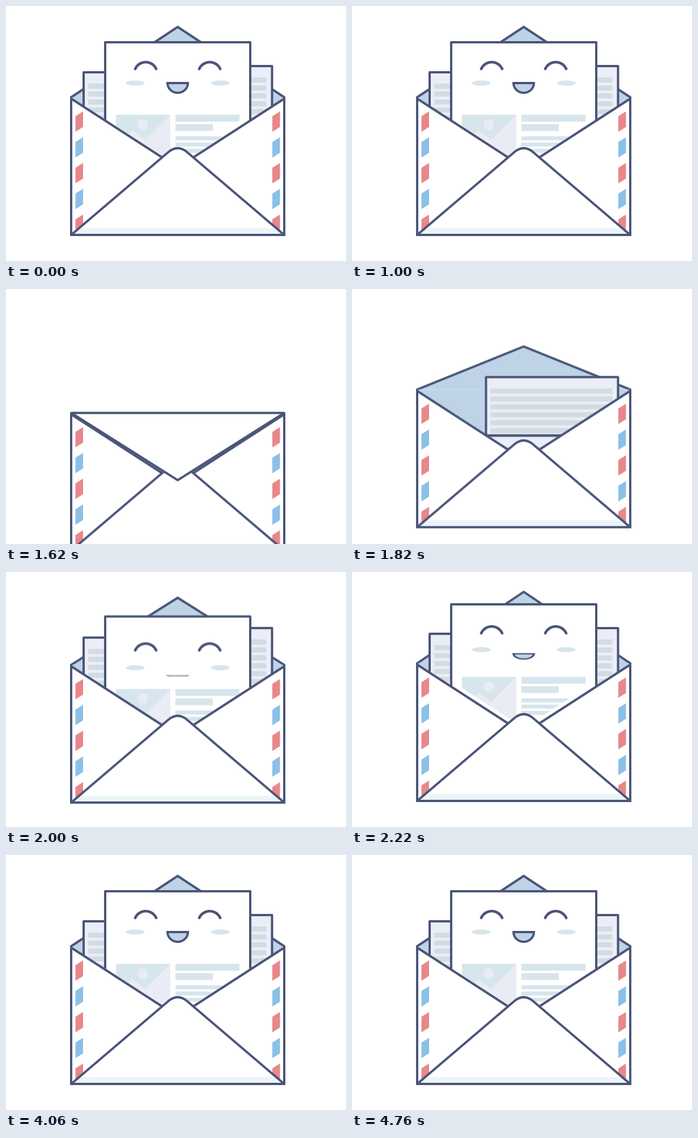
An HTML page that plays this animation: 600 px wide and 450 px high, repeating every 4.8 s.

```html
<!DOCTYPE html>
<html lang="en">
<head>
<meta charset="utf-8">
<title>Happy letter</title>
<style>
  html, body { margin: 0; width: 100%; height: 100%; overflow: hidden; background: #fff; }
  svg { display: block; width: 100%; height: 100%; }

  .ink { stroke: #4a5578; stroke-width: 4; stroke-linejoin: round; }
  .none { fill: none; }
  .white { fill: #fff; }
  .sky { fill: #bfd3e7; }
  .sheet { fill: #ebeef7; }
  .rule { stroke: #d3dce3; stroke-width: 9; fill: none; }
  .pale { fill: #d7e5ec; }
  .hill { fill: #e9ecf4; }
  .red { fill: #e9878b; }
  .blue { fill: #8bc0e8; }

  .move { animation: 4800ms linear infinite; }
  .env { animation-name: env; }
  .flap { transform-origin: 303px 161px; stroke-linejoin: miter; stroke-miterlimit: 3; stroke-linecap: round; vector-effect: non-scaling-stroke; }
  .open { animation-name: open; }
  .closed { animation-name: closed; }
  .right { animation-name: right; }
  .left { animation-name: left; }
  .front { animation-name: front; }
  .eyes { animation-name: eyes; }
  .cheeks { animation-name: cheeks; }
  .mouth { animation-name: mouth; transform-origin: 303px 154px; }
  .bit { animation-name: burst; opacity: 0; }

  @keyframes env {
    0%, 21% { transform: translateY(0); animation-timing-function: ease-in-out; }
    27%, 32.3% { transform: translateY(61.5px); animation-timing-function: cubic-bezier(.45, 0, .75, .75); }
    37.917% { transform: translateY(16.5px); animation-timing-function: cubic-bezier(.2, .6, .5, 1); }
    45.5%, 100% { transform: translateY(0); }
  }

  /* The flap is drawn behind the letters while open and over the pocket once folded. */
  @keyframes open {
    0%, 20.9% { transform: scaleY(1); animation-timing-function: ease-out; }
    22.1% { transform: scaleY(1.03); animation-timing-function: ease-in; }
    25.3% { transform: scaleY(0); visibility: visible; }
    25.4%, 36.2% { transform: scaleY(0); visibility: hidden; }
    36.25% { transform: scaleY(0); visibility: visible; }
    37.917% { transform: scaleY(.61); animation-timing-function: ease-out; }
    43.8% { transform: scaleY(1.03); animation-timing-function: ease-in-out; }
    46.25% { transform: scaleY(1.016); animation-timing-function: ease-out; }
    51%, 100% { transform: scaleY(1); }
  }
  @keyframes closed {
    0%, 25.2% { transform: scaleY(0); visibility: hidden; }
    25.3% { transform: scaleY(0); visibility: visible; animation-timing-function: ease-out; }
    27.5%, 33.3% { transform: scaleY(1); visibility: visible; animation-timing-function: ease-in; }
    36.2% { transform: scaleY(0); visibility: visible; }
    36.25%, 100% { transform: scaleY(0); visibility: hidden; }
  }

  @keyframes right {
    0%, 21.3% { transform: translateY(0); animation-timing-function: ease-in; }
    24.8%, 35.6% { transform: translateY(190px); }
    37.917% { transform: translateY(33.5px); animation-timing-function: ease-out; }
    41.5% { transform: translateY(-10px); animation-timing-function: ease-in-out; }
    46.25% { transform: translateY(-7px); animation-timing-function: ease-out; }
    52%, 100% { transform: translateY(0); }
  }
  @keyframes left {
    0%, 21.1% { transform: translateY(0); animation-timing-function: ease-in; }
    24.6%, 37% { transform: translateY(180px); }
    37.917% { transform: translateY(126.5px); animation-timing-function: ease-out; }
    42.5% { transform: translateY(-11px); animation-timing-function: ease-in-out; }
    46.25% { transform: translateY(-8px); animation-timing-function: ease-out; }
    52.5%, 100% { transform: translateY(0); }
  }
  @keyframes front {
    0%, 20.9% { transform: translateY(0); animation-timing-function: ease-in; }
    24.6%, 37.7% { transform: translateY(225px); animation-timing-function: cubic-bezier(.25, .3, .4, 1); }
    43.8% { transform: translateY(-11px); animation-timing-function: ease-in-out; }
    46.25% { transform: translateY(-7px); animation-timing-function: ease-out; }
    53%, 100% { transform: translateY(0); }
  }

  @keyframes eyes {
    0%, 26% { transform: translateY(0); }
    30%, 41% { transform: translateY(14px); }
    46.25% { transform: translateY(4px); animation-timing-function: ease-out; }
    52%, 100% { transform: translateY(0); }
  }
  @keyframes cheeks {
    0%, 26% { transform: translateY(0); }
    30%, 41% { transform: translateY(20px); }
    46.25% { transform: translateY(8px); animation-timing-function: ease-out; }
    52%, 100% { transform: translateY(0); }
  }
  @keyframes mouth {
    0%, 26% { transform: translateY(0) scaleY(1); }
    30%, 42% { transform: translateY(16px) scaleY(.12); }
    46.25% { transform: translateY(7px) scaleY(.54); animation-timing-function: ease-out; }
    52%, 100% { transform: translateY(0) scaleY(1); }
  }

  @keyframes burst {
    0%, 37.5% { transform: translate(80px, 157px) scale(.2); opacity: 0; animation-timing-function: ease-out; }
    42.9% { transform: translate(calc(80px + .85 * var(--x)), calc(157px + .85 * var(--y))) scale(1); opacity: 1; }
    46.25% { transform: translate(calc(80px + var(--x)), calc(157px + var(--y))) scale(1); opacity: .95; animation-timing-function: ease-out; }
    52%, 100% { transform: translate(calc(80px + 1.12 * var(--x)), calc(157px + 1.12 * var(--y))) scale(.4); opacity: 0; }
  }
</style>
</head>
<body>
<svg viewBox="0 0 600 450">
  <defs>
    <clipPath id="inside"><rect x="0" y="-50" width="600" height="454"/></clipPath>
    <clipPath id="printed"><path d="M115 160.5L303 282L491 160.5V0H115Z"/></clipPath>
    <path id="stamp" d="M0 8.5L13.5 0V27.5L0 36Z"/>
    <g id="stripes">
      <use href="#stamp" y="186" class="red"/>
      <use href="#stamp" y="231.5" class="blue"/>
      <use href="#stamp" y="277" class="red"/>
      <use href="#stamp" y="322.5" class="blue"/>
      <use href="#stamp" y="368" class="red"/>
    </g>
    <g id="note">
      <rect width="233" height="260" class="sheet ink"/>
      <path d="M8 24.5H223" class="rule" id="line"/>
      <use href="#line" y="14"/>
      <use href="#line" y="28"/>
      <use href="#line" y="42"/>
      <use href="#line" y="56"/>
      <use href="#line" y="70"/>
      <use href="#line" y="84"/>
      <use href="#line" y="98"/>
    </g>
    <g id="confetti" class="blue">
      <path class="move bit" style="--x:-18px;--y:-40px" d="M-5 1L2 -4L4 2L-3 4Z"/>
      <path class="move bit" style="--x:-43px;--y:-17px" d="M-5.5 -5L7 -1.5L5.5 5L-7 1.5Z"/>
      <path class="move bit" style="--x:-34px;--y:17px" d="M-4 -4L4 1L3 5L-4 4Z"/>
    </g>
  </defs>

  <use href="#confetti"/>
  <use href="#confetti" transform="translate(606) scale(-1 1)"/>

  <g class="move env">
    <path class="move flap open sky ink" d="M115 161L303 37L491 161"/>
    <rect x="115" y="161" width="376" height="243" class="sky"/>

    <g clip-path="url(#inside)">
      <g class="move right"><use href="#note" x="236.5" y="106"/></g>
      <g class="move left"><use href="#note" x="137" y="117"/></g>
      <g class="move front">
        <rect x="175" y="64" width="256" height="320" class="white ink"/>
        <g clip-path="url(#printed)" class="pale">
          <rect x="194" y="192" width="96" height="100"/>
          <path class="hill" d="M290 192L246 236L223 219L190 250V292H290Z"/>
          <circle class="hill" cx="241.5" cy="209" r="9.5"/>
          <path d="M299 192h113v12h-113zM299 208.5h66v12h-66zM299 230h113v7h-113zM299 241h113v7h-113zM299 252h113v7h-113z"/>
        </g>
        <g class="move cheeks pale">
          <ellipse cx="228" cy="136" rx="16.5" ry="4.6"/>
          <ellipse cx="378" cy="136" rx="16.5" ry="4.6"/>
        </g>
        <path class="move eyes ink none" style="stroke-width:4.6;stroke-linecap:round" d="M228 111A20.3 20.3 0 0 1 265 111M341 111A20.3 20.3 0 0 1 378 111"/>
        <path class="move mouth sky ink" style="stroke-linejoin:miter" d="M285 136H321A18 17.2 0 0 1 285 136Z"/>
      </g>
    </g>

    <path class="white" d="M115 163.5L303 285L491 163.5V404H115Z"/>
    <use href="#stripes" x="122.5"/>
    <use href="#stripes" x="470"/>
    <path class="ink none" d="M115 163.5L303 285L491 163.5"/>
    <path id="fold" class="white" d="M115 404L286 258.2Q303 243.7 320 258.2L491 404Z"/>
    <path fill="#ecf4f8" d="M129 392H477L491 404H115Z"/>
    <path class="ink none" d="M115 404L286 258.2Q303 243.7 320 258.2L491 404"/>
    <path class="ink none" style="stroke-linejoin:miter" d="M115 160V404H491V160"/>
    <path class="move flap closed white ink" d="M115 161L303 285L491 161Z"/>
  </g>
</svg>
</body>
</html>
```
